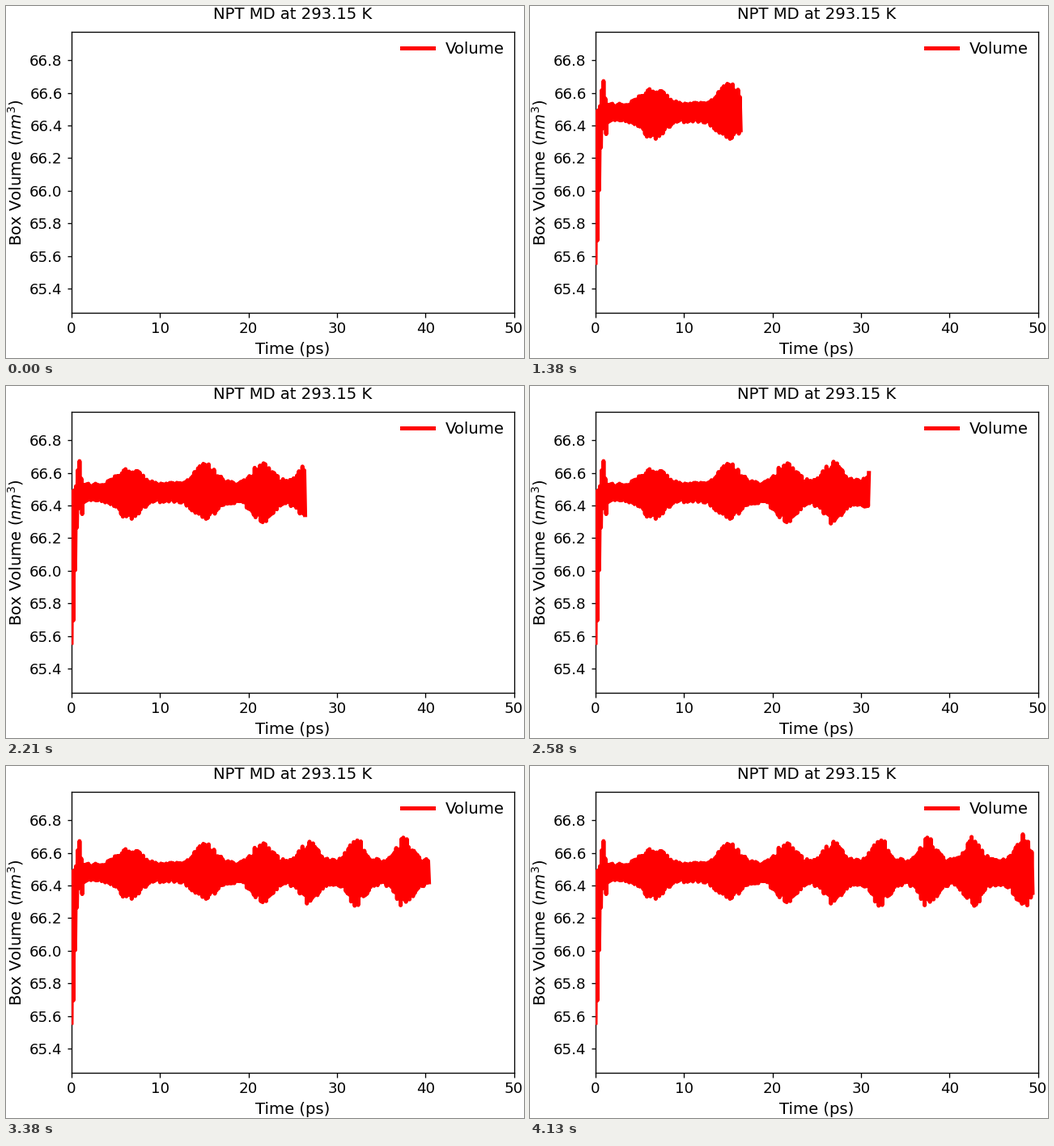
Write a matplotlib script that moves like this. It is 640x436 px and loops after 4.18 s.

```python
import numpy as np
import matplotlib.pyplot as plt
from matplotlib.animation import FuncAnimation
from matplotlib.lines import Line2D

W, H, DPI = 640, 436, 100
LEFT, RIGHT, TOP, BOTTOM = 81, 627.5, 32, 380
LOOP, TICK, FPS = 4180, 20, 24
STEPS, PER_STEP, DT = 100, 5, 0.1
MEAN = 66.48
BEATS = [6.5, 15.1, 21.6, 26.8, 32.2, 37.6, 42.7, 48.3]

plt.rcParams["font.family"] = "DejaVu Sans"


def pt(px):
    return px * 72 / DPI


def bump(t, centre, width):
    return np.exp(-((t - centre) / width) ** 2)


def make_volume(t):
    """Samples jump above and below the mean; the swing beats over time."""
    rng = np.random.default_rng(7)
    swing = (0.045 + 0.0006 * t) * np.minimum(t, 1)
    for c in BEATS:
        swing += (0.09 + 0.0008 * c) * bump(t, c, 1.85 - 0.016 * c)
    swing *= rng.uniform(0.8, 1.15, len(t))

    # The box first expands, overshoots and settles
    high = swing + 0.16 * bump(t, 0.85, 0.22)
    low = swing + 0.92 * bump(t, 0, 0.48) + 0.09 * bump(t, 1.2, 0.15)
    odd = np.arange(len(t)) % 2 == 1
    return MEAN + np.where(odd, high, -low)


time = np.arange(STEPS * PER_STEP) * DT
volume = make_volume(time)

fig = plt.figure(figsize=(W / DPI, H / DPI), dpi=DPI, facecolor="white")
ax = fig.add_axes([LEFT / W, 1 - BOTTOM / H,
                   (RIGHT - LEFT) / W, (BOTTOM - TOP) / H])
ax.set_xlim(0, 50)
ax.set_ylim(65.254, 66.973)
ax.set_xticks(range(0, 51, 10))
ax.set_yticks(np.arange(65.4, 66.9, 0.2))
ax.yaxis.set_major_formatter("{x:.1f}")
ax.tick_params(length=pt(5.5), width=pt(1.33), labelsize=pt(18.3), pad=4.2)
for spine in ax.spines.values():
    spine.set_linewidth(pt(1.33))


def label(x, y, text, **kw):
    kw = {"ha": "center", "va": "baseline", **kw}
    fig.text(x / W, 1 - y / H, text, fontsize=pt(19.6), **kw)


mid_x, mid_y = (LEFT + RIGHT) / 2, (TOP + BOTTOM) / 2
label(mid_x, 16, "NPT MD at 293.15 K")
label(mid_x, 431, "Time (ps)")
label(19, mid_y, "Box Volume ($nm^3$)", rotation=90, rotation_mode="anchor")
label(543, 59, "Volume", ha="left")

style = dict(color="red", lw=pt(5))
key_y = 1 - 52.5 / H
fig.add_artist(Line2D([488.5 / W, 527.5 / W], [key_y, key_y], **style))
line, = ax.plot([], [], zorder=3, **style)


def update(n):
    now = n * TICK + TICK / 2
    step = min(int(now * FPS / 1000 + 1e-9), STEPS - 1)
    count = step * PER_STEP
    line.set_data(time[:count], volume[:count])
    return line,


anim = FuncAnimation(fig, update, frames=LOOP // TICK, interval=TICK,
                     repeat=True, repeat_delay=0, cache_frame_data=False)
plt.show()
```
